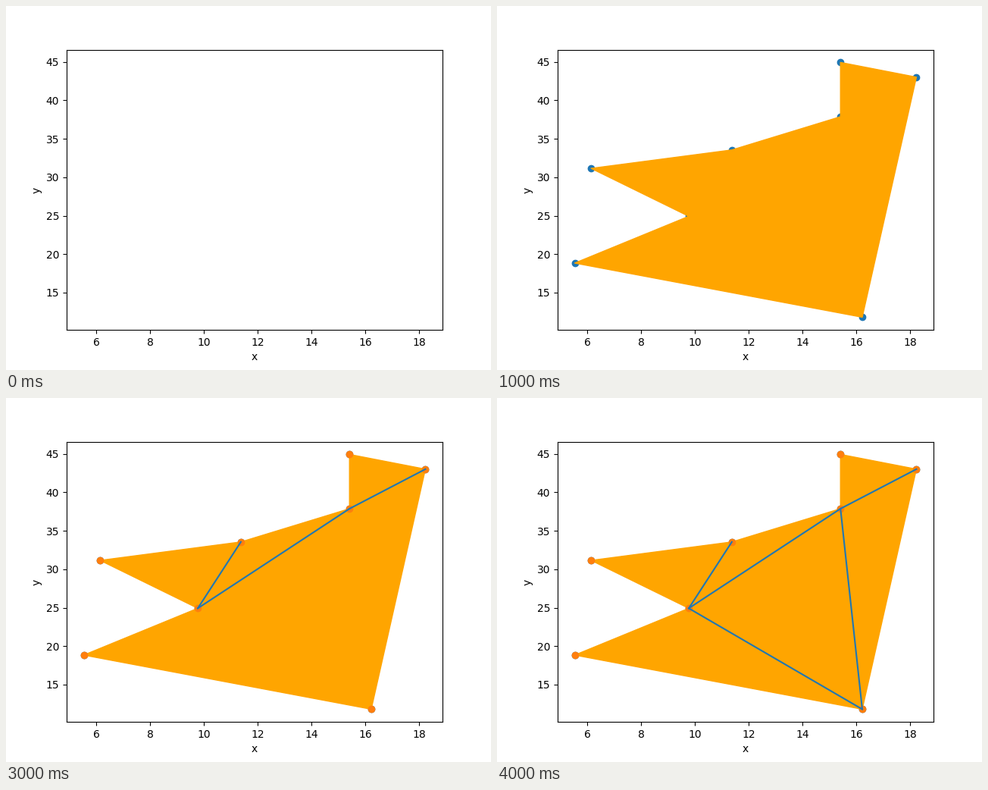
These frames come from a looping animation (640x480 px, 4500 ms). A matplotlib script:

```python
import matplotlib.pyplot as plt
from matplotlib.animation import FuncAnimation
from matplotlib.patches import Polygon

# Key points: polygon corners in order around the outline
A, B, C, D = (15.408, 44.935), (18.23, 43.02), (16.217, 11.8), (5.53, 18.84)
E, F, G, H = (9.77, 24.925), (6.14, 31.155), (11.37, 33.555), (15.408, 37.875)
corners = [A, B, C, D, E, F, G, H]

fig, ax = plt.subplots(figsize=(6.4, 4.8), dpi=100)
ax.set(xlabel="x", ylabel="y")


def dots(color):
    return ax.scatter(*zip(*corners), color=color)


def diagonal(start, end):
    return ax.plot(*zip(start, end), color="C0")[0]


# One more step is shown with every frame
steps = [
    dots("C0"),
    ax.add_patch(Polygon(corners, color="orange", joinstyle="round")),
    dots("C1"),
    diagonal(H, B),
    diagonal(E, G),
    diagonal(E, H),
    diagonal(H, C),
    diagonal(E, C),
]


def update(frame):
    for i, step in enumerate(steps):
        step.set_visible(i < frame)
    return steps


anim = FuncAnimation(
    fig, update, frames=len(steps) + 1, init_func=lambda: update(0),
    interval=500, repeat=True, repeat_delay=0,
)
plt.show()
```
